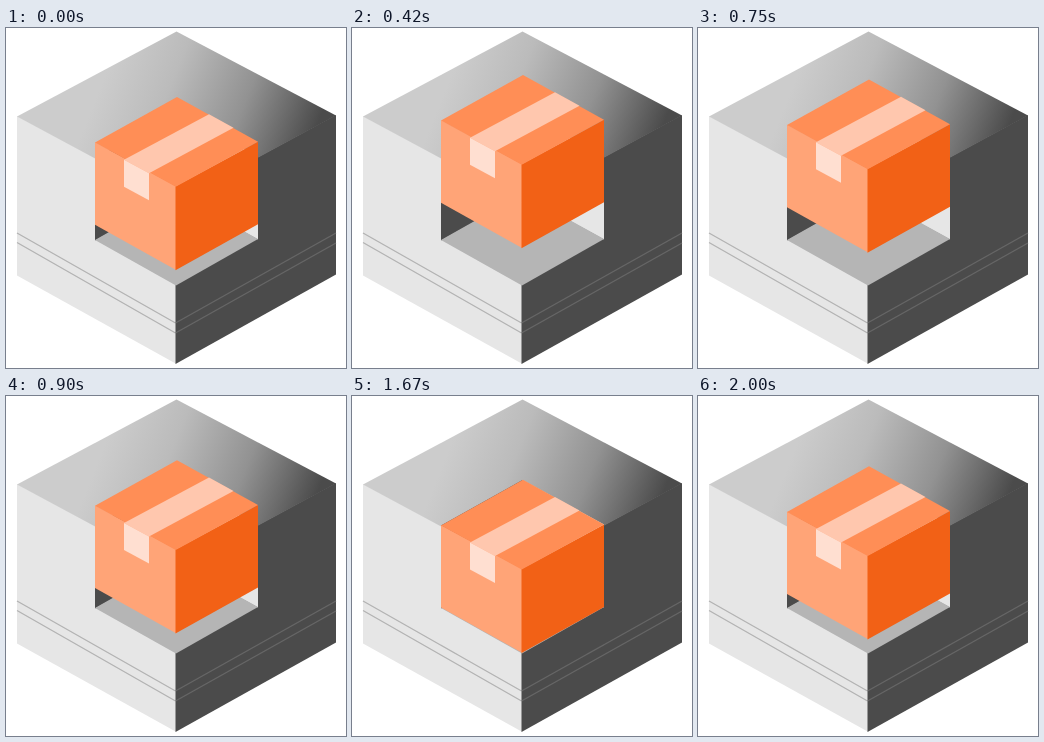
Animation of 340 by 340 pixels, one loop 2.03 s. Source, as an HTML page:

```html
<!DOCTYPE html>
<html>
<head>
<meta charset="utf-8">
<style>
  html, body { margin: 0; width: 100%; height: 100%; overflow: hidden; background: #fff; }
  svg { display: block; width: 100%; height: 100%; }
</style>
</head>
<body>
<svg viewBox="0 0 340 340">
  <defs>
    <linearGradient id="lid" gradientUnits="userSpaceOnUse" x1="100" y1="45" x2="300" y2="125">
      <stop offset="0" stop-color="#cccccc"/>
      <stop offset=".3" stop-color="#bbbbbb"/>
      <stop offset=".65" stop-color="#929292"/>
      <stop offset=".84" stop-color="#6c6c6c"/>
      <stop offset="1" stop-color="#4b4b4b"/>
    </linearGradient>
  </defs>

  <!-- machine -->
  <path fill="#e6e6e6" d="M11 88L170.5 173.5V336L11 247.5Z"/>
  <path fill="#4b4b4b" d="M330 87L169.5 173.5V336L330 246.5Z"/>
  <path fill="url(#lid)" d="M11 88.5L170.5 3.5L330 87.5L170 174Z"/>
  <g fill="none" stroke-width="1.3">
    <path stroke="#b3b3b3" d="M11 205L169.5 295M11 214.5L169.5 305"/>
    <path stroke="#666" d="M169.5 295L330 205M169.5 305L330 215"/>
  </g>

  <!-- notch -->
  <path fill="#4b4b4b" d="M89 129.5L170.5 84V167L89 212.5Z"/>
  <path fill="#e6e6e6" d="M252 128.5L170.5 84V167L252 211.5Z"/>
  <path fill="#b5b5b5" d="M89 212L170.5 166L252 211L170 257.5Z"/>

  <!-- parcel, top corner at y = 0 -->
  <g id="parcel">
    <path fill="#ffa477" d="M89 45L170.5 89V173L89 127.5Z"/>
    <path fill="#f26116" d="M252 44.5L169.5 89V173L252 127Z"/>
    <path fill="#ff8e56" d="M89 45.3L171 -.3L252 44.5L169.7 89.5Z"/>
    <path fill="#ffc7ae" d="M203 17L227.5 30.5L143 76L118 62.5Z"/>
    <path fill="#ffdfd1" d="M118 62.5L143 76V103L118 89.5Z"/>
  </g>
</svg>
<script>
  const LOOP = 2030, STEP = 30, REST = 1140, LIFT = 1670;
  // [time, y of the parcel's top corner]
  const path = [
    [0, 69.2], [420, 47.2], [540, 42], [600, 39], [REST, 85],
    [LIFT - STEP, 85], [LIFT, 84.1], [1835, 78], [2000, 70.6], [LOOP, 69.2]
  ];
  const parcel = document.getElementById('parcel');

  function snap(t) {
    if (t >= REST && t < LIFT) return REST;
    const base = t < REST ? 0 : LIFT;
    return base + Math.floor((t - base) / STEP) * STEP;
  }

  function height(t) {
    const i = path.findIndex(p => p[0] > t);
    const [t0, y0] = path[i - 1], [t1, y1] = path[i];
    return y0 + (y1 - y0) * (t - t0) / (t1 - t0);
  }

  const start = performance.now();
  function draw() {
    const t = (performance.now() - start) % LOOP;
    parcel.setAttribute('transform', `translate(0 ${height(snap(t)).toFixed(2)})`);
    requestAnimationFrame(draw);
  }
  draw();
</script>
</body>
</html>
```
